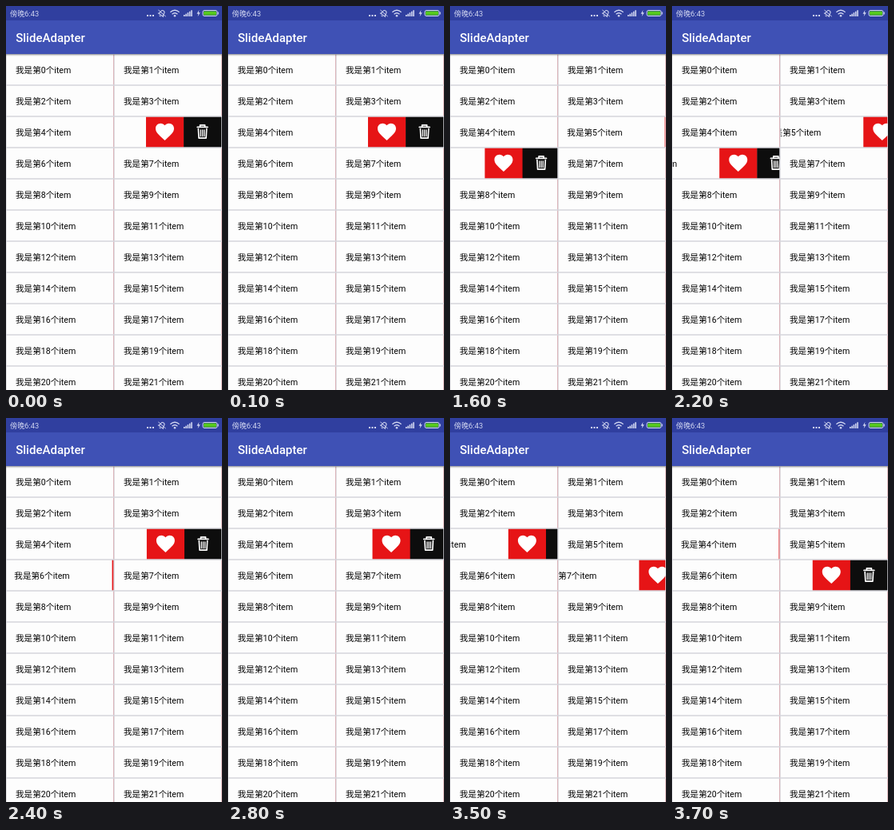
An HTML page for the animation above (4.1 s loop, 270 px wide and 480 px high).

```html
<!DOCTYPE html>
<html lang="zh-CN">
<head>
<meta charset="utf-8">
<title>SlideAdapter</title>
<style>
  html, body { margin: 0; width: 100%; height: 100%; overflow: hidden; background: #fdfdfd; }
  #stage { display: block; width: 100vw; height: 100vh; }
  text { font-family: Roboto, "Noto Sans CJK SC", "Noto Sans CJK", sans-serif; }
  .label { font-size: 10.6px; fill: #060606; }
  .title { font-size: 15px; font-weight: 500; fill: #fff; }
  .clock { font-size: 9.2px; fill: #d2d7f1; }
  .border { fill: none; stroke: #d6d6dc; stroke-width: .75; }
</style>
</head>
<body>
<svg id="stage" viewBox="0 0 270 480">
  <defs>
    <linearGradient id="shadow" x2="0" y2="1">
      <stop offset="0" stop-color="#000" stop-opacity=".3"/>
      <stop offset="1" stop-color="#000" stop-opacity="0"/>
    </linearGradient>
    <g id="actions">
      <rect width="47.5" height="39" fill="#e61416"/>
      <rect x="47.1" width="48" height="39" fill="#0d0d0d"/>
      <path transform="translate(9.7 5.4) scale(1.15)" fill="#fff"
        d="M12 21.35l-1.45-1.32C5.4 15.36 2 12.28 2 8.5 2 5.42 4.42 3 7.5 3c1.74 0 3.41.81 4.5 2.09C13.09 3.81 14.76 3 16.5 3 19.58 3 22 5.42 22 8.5c0 3.78-3.4 6.86-8.55 11.54z"/>
      <g transform="translate(-.4 0)" fill="none" stroke="#fff" stroke-width="1.7" stroke-linejoin="round" stroke-linecap="round">
        <path d="M64.6 13.4h12.8M68 13v-2.2h6V13M65.8 15.5l.7 11.6h9l.7-11.6"/>
        <path stroke-width="1.3" d="M68.8 16.8v8M71 16.8v8M73.2 16.8v8"/>
      </g>
    </g>
  </defs>

  <rect width="270" height="480" fill="#fdfdfd"/>
  <g id="grid"></g>

  <rect y="60" width="270" height="3" fill="url(#shadow)"/>
  <rect width="270" height="60" fill="#3f51b5"/>
  <rect width="270" height="18" fill="#303f9f"/>
  <text class="clock" x="5" y="13">傍晚6:43</text>
  <text class="title" x="12.2" y="45">SlideAdapter</text>

  <g fill="#d2d7f1">
    <path d="M176 11h2v2h-2zM179.500 11h2v2h-2zM183 11h2v2h-2z"/>
    <path d="M222 11h1.600v2H222zM224.300 9.700h1.600V13h-1.600zM226.600 8.200h1.600V13h-1.600zM228.900 6.700h1.600V13h-1.600zM231.200 5.200h1.600V13h-1.600z"/>
    <path d="M241.400 5l-2.900 4.700h2l-.8 3.500 3.100-4.900h-2z"/>
    <circle cx="211" cy="12.200" r="1.300"/>
  </g>
  <g fill="none" stroke="#d2d7f1" stroke-width="1.300">
    <path d="M205.400 7.800q5.600-5 11.200 0M207.600 10.200q3.400-3 6.800 0"/>
    <path transform="rotate(35 195 9)" stroke-width="1"
      d="M191.400 11.600h7.200l-1.200-1.800V8q-.2-2.600-2.400-2.600T192.600 8v1.800zM193.800 13.300h2.400"/>
    <path d="M190.400 5l9.200 8" stroke-width="1"/>
    <rect x="246" y="5.500" width="18" height="7" rx="2" stroke-width="1"/>
  </g>
  <rect x="247" y="6.500" width="16" height="5" rx="1" fill="#55c81e"/>
  <rect x="264.500" y="7.500" width="1.200" height="3" fill="#d2d7f1"/>
</svg>

<script>
const CELL_W = 135, CELL_H = 39, TOP = 60, ROWS = 11, BORDER = 0.75;
const OPEN = 94.25, SLIDE_MS = 300, FRAME_MS = 100, LOOP = 4100;
const FIRST_OPEN = 5;

// Each swipe opens one item and closes the one opened before it.
const SWIPES = [
  {opens: 6, openAt: 1400, closeAt: 1359},
  {opens: 5, openAt: 2164, closeAt: 2178},
  {opens: 4, openAt: 2800, closeAt: 2794},
  {opens: 7, openAt: 3460, closeAt: 3460}
];

function cell(i) {
  const x = (i % 2) * CELL_W, y = TOP + Math.floor(i / 2) * CELL_H;
  return `<svg x="${x}" y="${y}" width="${CELL_W}" height="${CELL_H}" overflow="hidden">
    <g class="slide">
      <text class="label" x="12" y="24">我是第${i}个item</text>
      <use href="#actions" x="${CELL_W - BORDER}"/>
    </g>
    <rect class="border" x="${BORDER / 2}" y="${BORDER / 2}"
      width="${CELL_W - BORDER}" height="${CELL_H - BORDER}"/>
  </svg>`;
}

const grid = document.getElementById("grid");
grid.innerHTML = Array.from({length: ROWS * 2}, (_, i) => cell(i)).join("");
const slides = [...grid.querySelectorAll(".slide")];

function eased(time, start) {
  const p = Math.min(1, Math.max(0, (time - start) / SLIDE_MS));
  return 1 - (1 - p) ** 3;
}

function show(time) {
  const openness = slides.map((_, i) => i === FIRST_OPEN ? 1 : 0);
  let previous = FIRST_OPEN;
  for (const {opens, openAt, closeAt} of SWIPES) {
    openness[previous] -= eased(time, closeAt);
    openness[opens] += eased(time, openAt);
    previous = opens;
  }
  slides.forEach((slide, i) => slide.setAttribute("transform", `translate(${-OPEN * openness[i]} 0)`));
}

const begin = performance.now();
function tick() {
  const time = (performance.now() - begin) % LOOP;
  show(Math.floor(time / FRAME_MS) * FRAME_MS);
  requestAnimationFrame(tick);
}
tick();
</script>
</body>
</html>
```
